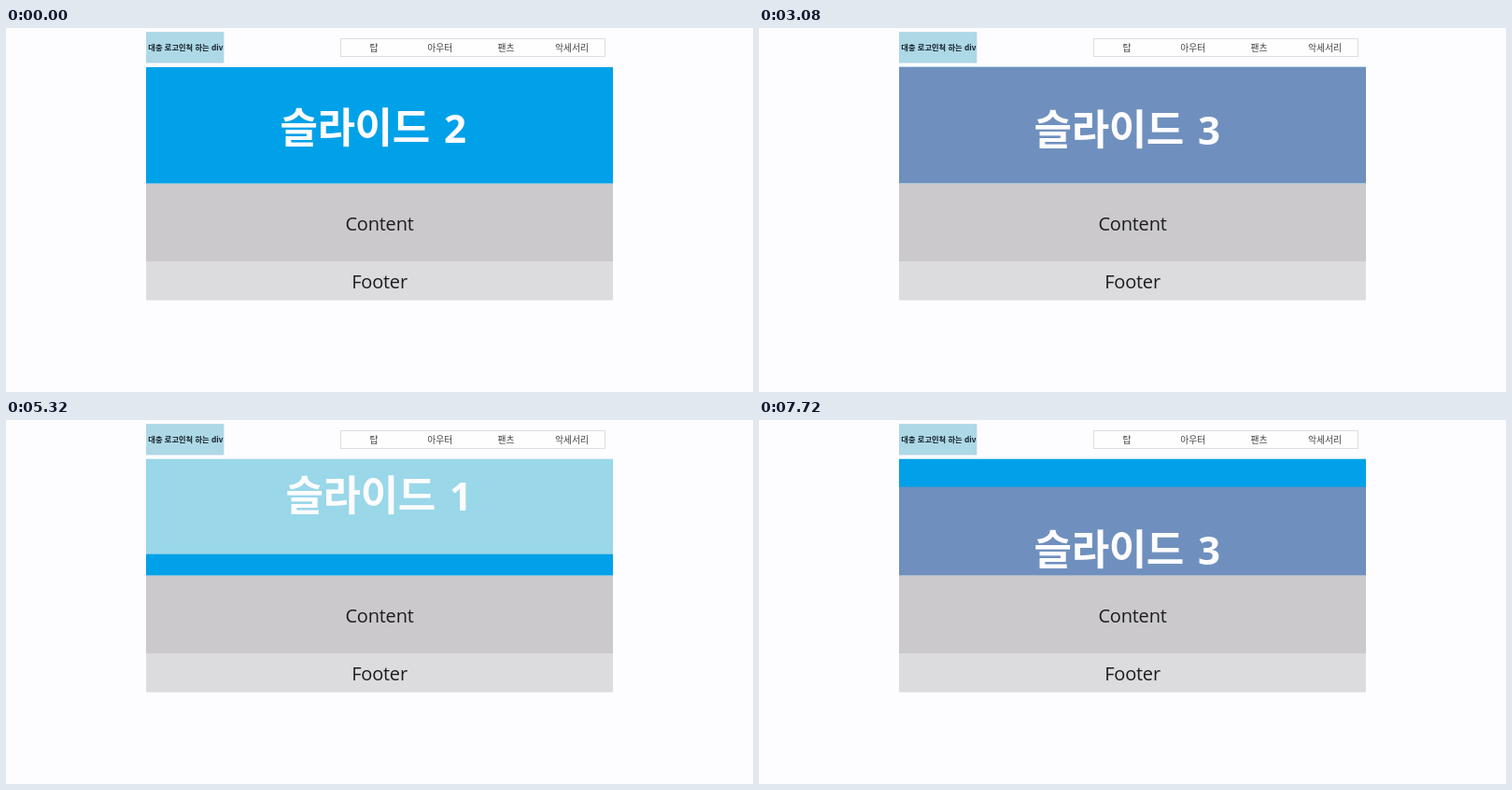
An HTML page for the animation above (7760 ms loop, 800 px wide and 390 px high).

```html
<!DOCTYPE html>
<html lang="ko">
<head>
<meta charset="utf-8">
<title>슬라이드</title>
<style>
  html, body { margin: 0; width: 100%; height: 100%; overflow: hidden; background: #fdfcfe; }
  svg { display: block; }
  text { font-family: "Open Sans", "Noto Sans CJK KR", "Noto Sans CJK", sans-serif; }
  .ko { font-family: "Noto Sans CJK KR", "Noto Sans CJK", sans-serif; }
  .logo { font-size: 8.25px; font-weight: 700; fill: #16202a; }
  .nav { font-size: 9.8px; fill: #404040; text-anchor: middle; }
  .label { font-size: 20px; letter-spacing: -.2px; fill: #1c1b1d; text-anchor: middle; }
  .title { font-size: 44px; font-weight: 700; letter-spacing: -.4px; fill: #fdfcfe; }
  .digit { font-size: 42px; font-weight: 700; fill: #fdfcfe; }
</style>
</head>
<body>
<svg width="800" height="390" viewBox="0 0 800 390">
  <rect x="150" y="4.2" width="83.4" height="33.3" fill="#add8e6"/>
  <text class="logo ko" x="152.3" y="24">대충 로고인척 하는 div</text>

  <rect x="358.5" y="11.5" width="283" height="19" fill="#fefefe" stroke="#dddcde"/>
  <g id="nav"></g>

  <svg x="150" y="41.67" width="500" height="125" overflow="hidden">
    <g id="strip"></g>
  </svg>

  <rect x="150" y="166.67" width="500" height="83.33" fill="#cbc9cc"/>
  <text class="label" x="400" y="216.6">Content</text>
  <rect x="150" y="250" width="500" height="41.67" fill="#dcdbdd"/>
  <text class="label" x="400" y="279.2">Footer</text>
</svg>
<script>
  const LOOP = 7760, STEP = 40, MOVE = 1000, HEIGHT = 125;
  const STARTS = [1063, 3050, 5038, 7046];

  // Text positions are relative to the top left of each slide.
  const SLIDES = {
    1: { color: '#99d7e9', x: 149.5, digitX: 325, y: 78.6 },
    2: { color: '#00a1e8', x: 143.4, digitX: 319, y: 81.6 },
    3: { color: '#6f90be', x: 144.6, digitX: 320, y: 83.4 }
  };
  const ORDER = [2, 3, 1, 2, 3];

  const strip = document.getElementById('strip');
  strip.innerHTML = ORDER.map((n, i) => {
    const s = SLIDES[n];
    return `<g transform="translate(0 ${i * HEIGHT})">
      <rect width="500" height="${HEIGHT + 0.5}" fill="${s.color}"/>
      <text class="title ko" x="${s.x}" y="${s.y}">슬라이드</text>
      <text class="digit" x="${s.digitX}" y="${s.y}">${n}</text>
    </g>`;
  }).join('');

  document.getElementById('nav').innerHTML = ['탑', '아우터', '팬츠', '악세서리']
    .map((name, i) => `<text class="nav ko" x="${394 + i * 70.7}" y="25.2">${name}</text>`)
    .join('');

  const swing = p => 0.5 - Math.cos(Math.PI * Math.min(1, Math.max(0, p))) / 2;

  function draw(time) {
    const t = Math.floor((time % LOOP) / STEP) * STEP;
    const shift = STARTS.reduce((sum, start) => sum + swing((t - start) / MOVE), 0);
    strip.setAttribute('transform', `translate(0 ${(-shift * HEIGHT).toFixed(2)})`);
  }

  const begin = performance.now();
  function tick() {
    draw(performance.now() - begin);
    requestAnimationFrame(tick);
  }
  tick();
</script>
</body>
</html>
```
